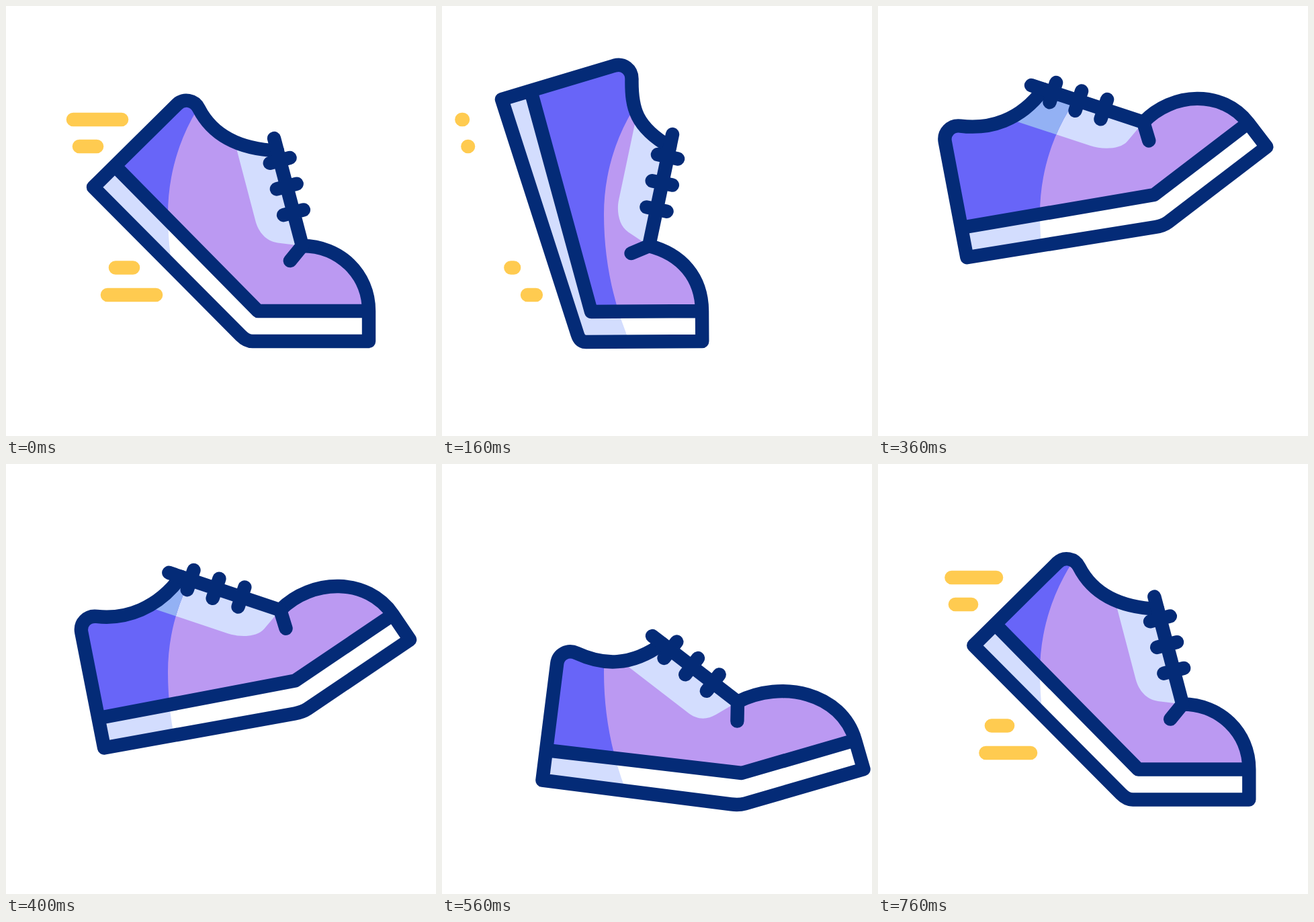
Write an HTML page that moves like this. It is 640x640 px and loops after 800 ms.

```html
<!DOCTYPE html>
<html lang="en">
<head>
<meta charset="utf-8">
<title>Running shoe</title>
<style>
  html, body { margin: 0; width: 100%; height: 100%; overflow: hidden; background: #fff; }
  svg { display: block; width: 100vw; height: 100vh; }
  .ink { fill: none; stroke: #042b77; stroke-width: 20.4; stroke-linecap: round; stroke-linejoin: round; }
</style>
</head>
<body>
<svg viewBox="0 0 640 640">
  <defs>
    <clipPath id="shadow"><path d="M374 60A301 301 0 0 0 241 310A490 490 0 0 0 288.3 520L280 640H-40V0H374Z"/></clipPath>
    <clipPath id="inside"><path data-d="upper"/></clipPath>
  </defs>
  <path data-d="speed" fill="none" stroke="#ffcb50" stroke-width="20.6" stroke-linecap="round"/>
  <path data-d="sole" fill="#fff"/>
  <path data-d="upper" fill="#bb99f2"/>
  <g clip-path="url(#inside)"><path data-d="tongue" fill="#d3ddfe"/></g>
  <g clip-path="url(#shadow)">
    <path data-d="sole" fill="#d3ddfe"/>
    <path data-d="upper" fill="#6865f8"/>
    <g clip-path="url(#inside)"><path data-d="tongue" fill="#93b1f4"/></g>
  </g>
  <path data-d="outline" class="ink"/>
  <path data-d="laces" class="ink"/>
</svg>
<script>
const LOOP = 800, STEP = 40, SOLE = 45, LACE_LEAN = Math.PI / 6;
const times = [0, 160, 240, 360, 480, 560, 760];

// Five joints carry the motion, everything else is built on them.
const joints = {
  heel:    [[162, 238], [132, 126], [40, 171], [124, 330], [149, 446], [155, 426]],
  bend:    [[375, 454], [222, 455], [298, 339], [411, 281], [447, 437], [446, 460]],
  toe:     [[540, 454], [387, 454], [458, 283], [551, 174], [611, 374], [615, 411]],
  laceTop: [[399, 197], [343, 191], [243, 78], [228, 118], [285, 253], [313, 256]],
  laceEnd: [[441, 357], [308, 357], [333, 222], [395, 173], [426, 335], [440, 354]]
};
// the shoe lands in its first pose, a little ahead, and slides back
for (const list of Object.values(joints)) list.push([list[0][0] + 12.3, list[0][1] + 0.5]);

const streaks = [
  { y: 169, left: 100, right: 172, end: 28, life: 178 },
  { y: 209, left: 109, right: 135, end: 37, life: 178 },
  { y: 389.5, left: 163, right: 189, end: 89.5, life: 250 },
  { y: 430, left: 151, right: 223, end: 122, life: 250 }
];

const n = times.length;
const wrap = i => (i + n) % n;
const span = i => (times[wrap(i + 1)] - times[wrap(i)] + LOOP) % LOOP;

// closed cubic spline through the poses
function spline(list, axis, t) {
  let i = n - 1;
  while (times[i] > t) i--;
  const at = k => list[wrap(k)][axis];
  const rate = k => (at(k + 1) - at(k)) / span(k);
  const slope = k => (rate(k) * span(k - 1) + rate(k - 1) * span(k)) / (span(k - 1) + span(k));
  const h = span(i), s = (t - times[i]) / h, r = 1 - s;
  return r * r * (1 + 2 * s) * at(i) + s * s * (3 - 2 * s) * at(i + 1)
    + h * s * r * (r * slope(i) - s * slope(i + 1));
}

const angle = (a, b) => Math.atan2(b[1] - a[1], b[0] - a[0]);
const dist = (a, b) => Math.hypot(b[0] - a[0], b[1] - a[1]);
// point at a distance forward and up from p, in a frame turned by a
const place = (p, a, forward, up = 0) => [
  p[0] + forward * Math.cos(a) + up * Math.sin(a),
  p[1] + forward * Math.sin(a) - up * Math.cos(a)
];
const draw = parts => parts.map(p => typeof p === "string" ? p : p.map(v => v.toFixed(2)).join(" ")).join(" ");

// streaks grow to the left until the loop restarts, then shrink into their end
function streakPath(t) {
  const u = (t + 200) % LOOP - 200;
  return streaks.map(({ y, left, right, end, life }) => {
    if (u < -160 || u > life) return "";
    if (u < 0) {
      right -= 0.1 * u;
      left = right - (right + 0.1 * u - left) * Math.sin((1 + u / 160) * Math.PI / 2);
    } else {
      const rest = (1 - u / life) ** 1.7;
      left = end + (left - end) * rest;
      right = end + (right - end) * rest;
    }
    return `M${left} ${y}H${right + 0.01}`;
  }).join("");
}

function shapes(t) {
  const j = {};
  for (const name in joints) j[name] = [spline(joints[name], 0, t), spline(joints[name], 1, t)];
  const { heel, bend, toe, laceTop, laceEnd } = j;

  const lace = angle(laceTop, laceEnd);
  const tilt = (angle(heel, bend) + lace - LACE_LEAN) / 2;
  const front = angle(bend, toe);

  // heel counter and collar
  const back = place(heel, tilt, 0, 130);
  const rim = place(heel, tilt, 27, 149);
  const rimEnd = place(laceTop, lace, 19);
  const collar = [back, "C", place(back, tilt, 0, 14), place(rim, tilt, -14, 4.5), rim,
    "C", place(rim, tilt, 41, -13), place(rimEnd, tilt, -43, -40), rimEnd];

  // toe cap
  const round = 0.4 * dist(laceEnd, toe);
  const heading = (tilt - Math.PI / 4 + front) / 2;
  const cap = [laceEnd, "C", place(laceEnd, heading, round), place(toe, front, 0, round), toe];

  // sole
  const heelLow = place(heel, tilt, 0, -SOLE);
  const toeLow = place(toe, front, 0, -SOLE);
  const kink = place(bend, front, -17, -SOLE);
  const bottom = [heelLow, "L", place(kink, angle(kink, heelLow), 12),
    "Q", kink, place(kink, front, 9), "L", toeLow];

  // tongue hangs from the lace line
  const edge = place(laceTop, lace, 112, -58);
  const flare = lace - 1.19;
  const tongue = ["M", place(edge, lace, -150), "L", edge,
    "C", place(edge, lace, 17), place(laceEnd, flare, -54), place(laceEnd, flare, -37),
    "L", laceEnd, "L", laceTop, "Z"];

  const laces = ["M", laceTop, "L", laceEnd, "L", place(laceEnd, tilt, 3, -28.5)];
  for (let k = 0; k < 3; k++) {
    const along = 34 + 40 * k;
    laces.push("M", place(laceTop, lace, along, -15.4), "L", place(laceTop, lace, along, 15.4));
  }

  return {
    speed: streakPath(t),
    sole: draw(["M", ...bottom, "L", toe, "L", bend, "L", heel, "Z"]),
    upper: draw(["M", heel, "L", ...collar, "L", ...cap, "L", bend, "Z"]),
    tongue: draw(tongue),
    outline: draw(["M", ...collar, "M", back, "L", heel, "L", ...bottom, "L", toe,
      "M", heel, "L", bend, "L", toe, "M", ...cap]),
    laces: draw(laces)
  };
}

const paths = [...document.querySelectorAll("[data-d]")];
const start = performance.now();

function render(now) {
  const t = Math.floor((Math.max(0, now - start) % LOOP) / STEP) * STEP;
  const d = shapes(t);
  for (const p of paths) p.setAttribute("d", d[p.dataset.d]);
}
function tick() {
  render(performance.now());
  requestAnimationFrame(tick);
}
render(start);
requestAnimationFrame(tick);
</script>
</body>
</html>
```
